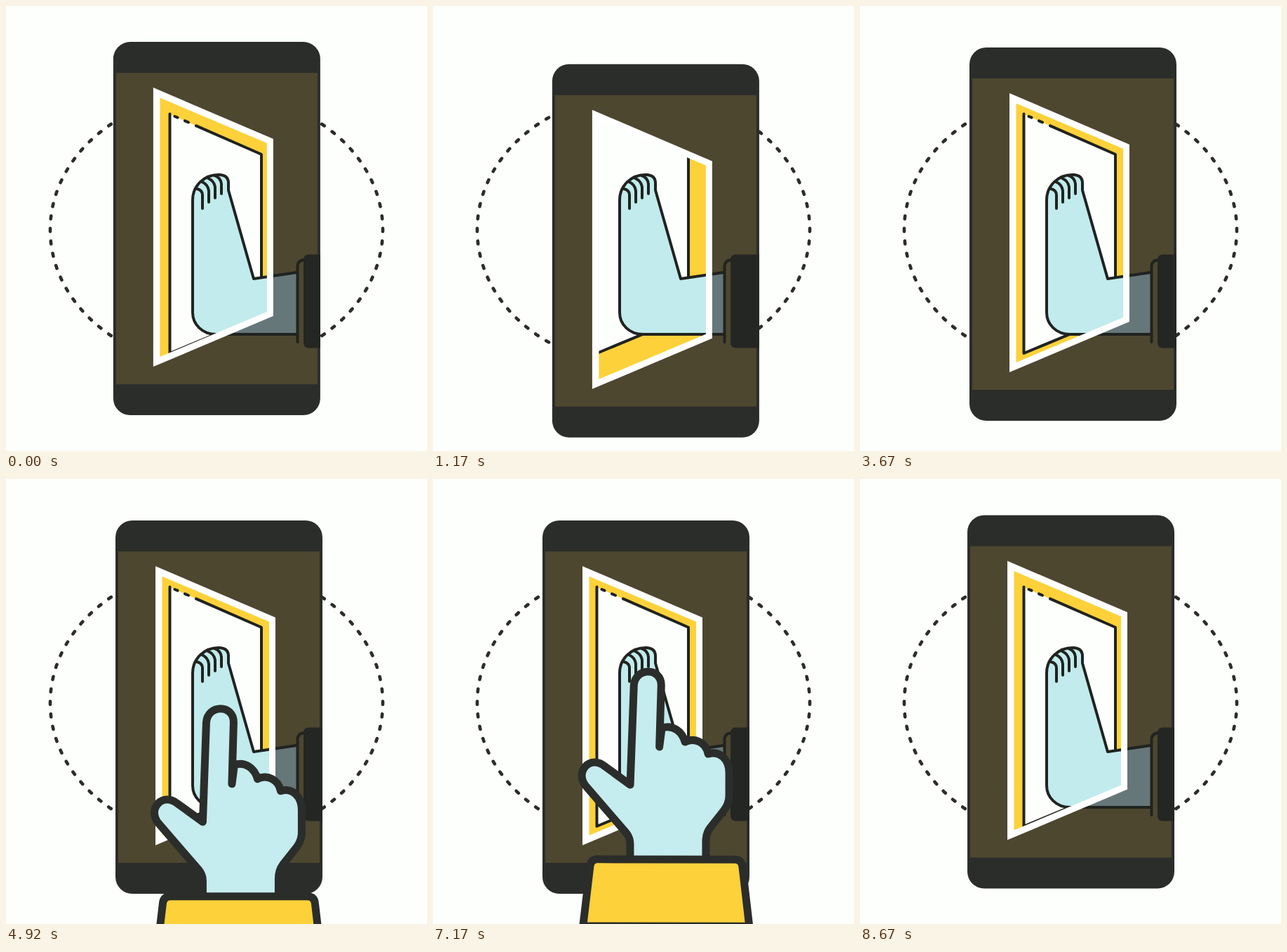
An HTML page for the animation above (8760 ms loop, 600 px wide and 633 px high).

```html
<!DOCTYPE html>
<html lang="en">
<head>
<meta charset="utf-8">
<title>Door in a phone</title>
<style>
  html, body { margin: 0; width: 100%; height: 100%; overflow: hidden; background: #fdfffd; }
  svg { display: block; width: 100%; height: 100%; }
  .line { fill: none; stroke: #20231f; stroke-width: 4; stroke-linecap: round; stroke-linejoin: round; }
  .bold { stroke: #2b2d2a; stroke-width: 11; stroke-linecap: round; stroke-linejoin: round; }
</style>
</head>
<body>
<svg viewBox="0 0 600 633">
  <defs>
    <clipPath id="phoneClip"><rect class="follow" x="156" y="59" width="295" height="531" rx="24"/></clipPath>
    <clipPath id="windowClip"><path class="follow" d="M218 131L379.5 200V446L218 514Z"/></clipPath>
    <path id="leg" d="M414 379L353 388L317 262V252C317 244 312 240 303 240C283 240 266 255 266 276V436C266 453 280 467 299 467H414"/>
  </defs>

  <ellipse cx="300" cy="318.5" rx="237" ry="194.500" pathLength="76" fill="none" stroke="#2b2d2a"
    stroke-width="4.600" stroke-linecap="round" stroke-dasharray=".24 .76" stroke-dashoffset=".12"/>

  <g class="follow">
    <rect x="156" y="59" width="295" height="531" rx="24" fill="#2b2d2a"/>
    <rect x="160" y="103" width="287" height="443" fill="#4d4730"/>
  </g>

  <g clip-path="url(#phoneClip)">
    <use href="#leg" class="line" style="fill:#66777a"/>
    <path d="M415 478V371Q415 361 427 361V478Z" fill="#4d4730"/>
    <path class="line" d="M415.500 478V371Q415.500 361 427 361"/>
    <rect x="424" y="353.500" width="60" height="133" rx="7" fill="#242623"/>
  </g>

  <g clip-path="url(#windowClip)">
    <rect x="190" y="90" width="230" height="470" fill="#fdd13a"/>
    <path d="M233.500 154L364 211V440L233.500 494Z" fill="#fdfffd"/>
    <path class="line" d="M233.500 153.500V494L364 440M240.500 157L244.500 158.700M255 163.300L260 165.500M271 170.300L364 211V440"/>
    <use href="#leg" class="line" style="fill:#c1ebec"/>
    <path class="line" d="M280 288V269Q280 262 272 260M289 279V263Q288 254 279 250M298 273V258Q297 249 288 245M307 267V253Q306 244 297 241"/>
  </g>

  <path class="follow" fill="#fefffe" fill-rule="evenodd"
    d="M213 124L384 197V449L213 521ZM222.500 138.500V507L375 443V203Z"/>

  <g id="rays" class="bold"></g>

  <g id="hand" class="bold">
    <path id="palm" fill="#c5ecee"/>
    <path fill="#fdd13a" d="M212 632L222 547Q223 537 233 537H428Q438 537 439 547L449 632Z"/>
  </g>
</svg>

<script>
const LOOP = 8760;

// Phone sway: time, x, y. The first and last keys reach across the loop seam.
const sway = [
  [-1260, 0, 0], [200, -3.3, -8.3], [1100, 14, 24], [2700, -2, -12],
  [3600, 0, 0], [7500, 0, 0], [8960, -3.3, -8.3]
];

// Ray direction in degrees, start radius, end radius.
const rays = [
  [-90, 38, 76], [-135, 41, 74], [-45, 41, 75],
  [180, 51, 77], [0, 52, 79], [138, 62, 71], [40, 59, 73]
];

const clamp = v => Math.min(1, Math.max(0, v));
const progress = (t, from, to) => clamp((t - from) / (to - from));
const smooth = (t, from, to) => {
  const p = progress(t, from, to);
  return p * p * (3 - 2 * p);
};
const mix = (a, b, p) => a + (b - a) * p;

const followers = document.querySelectorAll('.follow');
const hand = document.getElementById('hand');
const palm = document.getElementById('palm');
const rayGroup = document.getElementById('rays');
const rayPaths = rays.map(() =>
  rayGroup.appendChild(document.createElementNS('http://www.w3.org/2000/svg', 'path')));

function movePhone(t) {
  const i = sway.findIndex(key => key[0] > t);
  const [from, x0, y0] = sway[i - 1];
  const [to, x1, y1] = sway[i];
  const p = smooth(t, from, to);
  const move = `translate(${mix(x0, x1, p)} ${mix(y0, y1, p)})`;
  followers.forEach(el => el.setAttribute('transform', move));
}

function moveHand(t) {
  const below = 1 - smooth(t, 3700, 5300);
  const away = smooth(t, 7100, 8300);
  const x = 10 * below + 227 * away;
  const y = 400 * below + 394 * away;
  hand.setAttribute('transform', `translate(${x} ${y}) rotate(${8 * away} 305 270)`);

  const press = 3 * smooth(t, 5300, 5550) * (1 - smooth(t, 5550, 6670));
  const tip = 289.5 + press;
  palm.setAttribute('d', `M279 537V515Q279 506 273 499L215 432C200 412 222 388 243 405L279 431
    L284 ${tip}C286 ${tip - 26} 323 ${tip - 26} 323 ${tip}L320.5 377L324 350
    C340 345 353 355 357 370C371 363 387 371 390 387C406 382 420 394 420 414V446
    Q420 458 412 468L393 492Q387 500 387 512V537`);
}

function drawRays(t) {
  const head = 1 - (1 - progress(t, 5500, 5830)) ** 2;
  const tail = smooth(t, 5830, 6250);
  rayGroup.style.display = head > 0 && tail < 1 ? '' : 'none';
  rays.forEach(([angle, start, end], i) => {
    const cos = Math.cos(angle * Math.PI / 180);
    const sin = Math.sin(angle * Math.PI / 180);
    const point = r => `${298 + r * cos} ${276 + r * sin}`;
    const outer = mix(start, end, head) + 14 * tail;
    const inner = mix(start, outer, tail);
    rayPaths[i].setAttribute('d', `M${point(inner)}L${point(outer)}`);
  });
}

function draw(now) {
  const t = now % LOOP;
  movePhone(t);
  moveHand(t);
  drawRays(t);
}

const begin = performance.now();
function tick() {
  draw(performance.now() - begin);
  requestAnimationFrame(tick);
}
tick();
</script>
</body>
</html>
```
